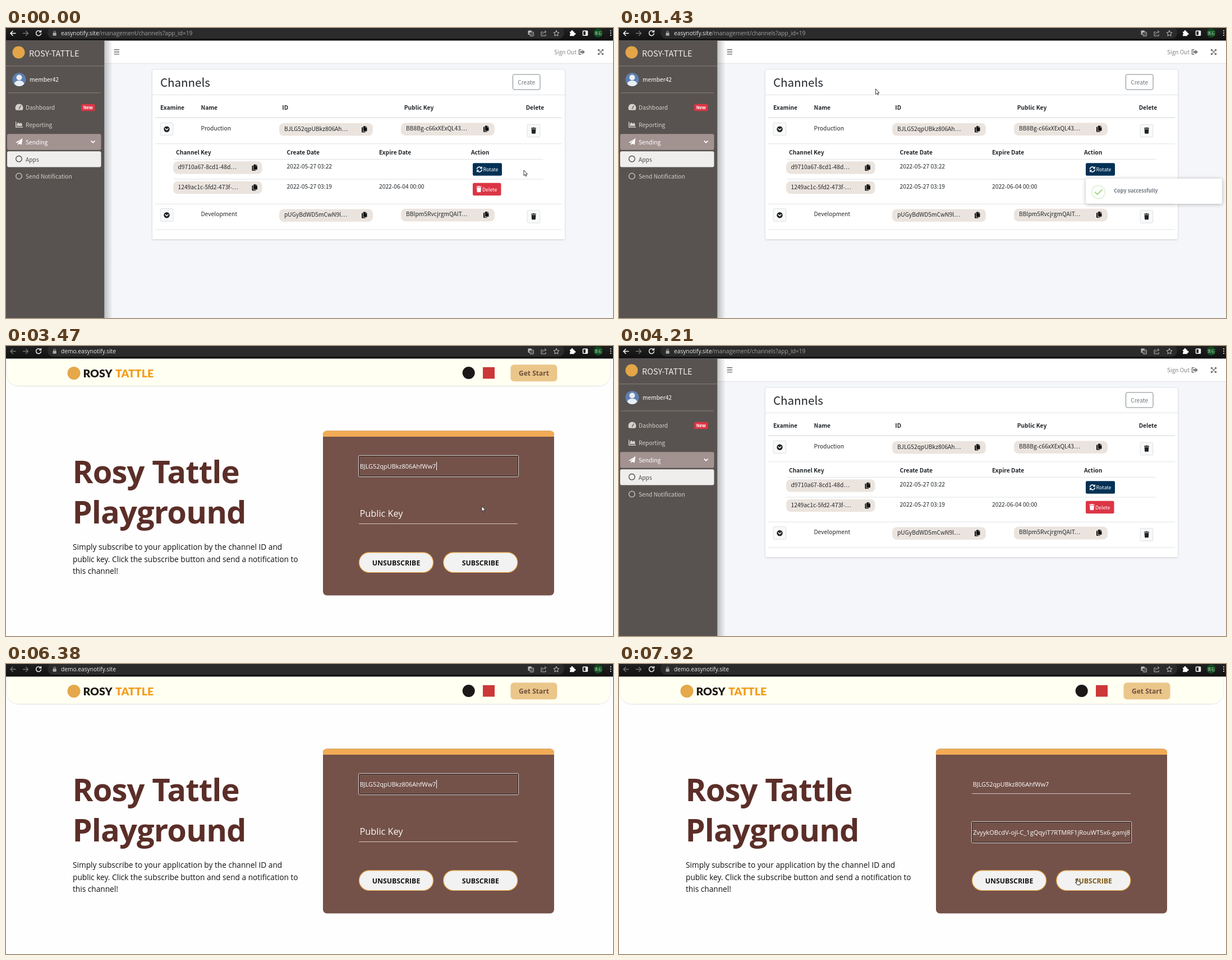
Recreate the animation shown at these times as an HTML page. Size 1082 by 518 pixels, loop 7990 ms.

```html
<!DOCTYPE html>
<html lang="en">
<head>
<meta charset="utf-8">
<title>Channel setup walkthrough</title>
<style>
  html, body { margin: 0; width: 100%; height: 100%; overflow: hidden; background: #fff; }
  svg { display: block; width: 100vw; height: 100vh; }
  text { white-space: pre; }
  .ui { font: 10.25px "Noto Sans CJK SC", "Noto Sans CJK JP", "Noto Sans", sans-serif; fill: #212529; }
  .seg { font: 10.2px "Open Sans", "Noto Sans", sans-serif; fill: #111; }
  .b { font-weight: 700; }
  .mid { text-anchor: middle; }
  .end { text-anchor: end; }
  .line { stroke: #dee2e6; fill: none; }
  .stroke { fill: none; stroke-linecap: round; stroke-linejoin: round; }
  #toast { transform-origin: 953.5px 291.5px; }
  #arc { transform-origin: 854.5px 293px; }
</style>
</head>
<body>
<svg id="stage" viewBox="0 0 1082 518" preserveAspectRatio="none" xmlns="http://www.w3.org/2000/svg"></svg>
<script>
const LOOP = 7990;

// Drawing helpers
const text = (x, y, s, cls = '', style = '', id = '') =>
  `<text x="${x}" y="${y}" class="${cls}" style="${style}" ${id && `id="${id}"`}>${s}</text>`;
const rect = (x, y, w, h, fill, r = 0, more = '') =>
  `<rect x="${x}" y="${y}" width="${w}" height="${h}" rx="${r}" fill="${fill}" ${more}/>`;
const circle = (x, y, r, fill, more = '') =>
  `<circle cx="${x}" cy="${y}" r="${r}" fill="${fill}" ${more}/>`;
const path = (d, fill, more = '') => `<path d="${d}" fill="${fill}" ${more}/>`;
const stroke = (d, color, w = 1) =>
  `<path class="stroke" d="${d}" stroke="${color}" stroke-width="${w}"/>`;
const hline = (x1, x2, y, w = 1) => `<path class="line" d="M${x1} ${y}H${x2}" stroke-width="${w}"/>`;
const at = (x, y, s) => `<g transform="translate(${x} ${y})">${s}</g>`;

// Icons
const copyIcon = (x, y) => at(x, y,
  path('M3.6 0H6.8V2.8H9.5V8.4Q9.5 9.2 8.7 9.2H3.6Q2.8 9.2 2.8 8.4V.8Q2.8 0 3.6 0ZM7.4 0 9.5 2.2H7.4Z', '#111') +
  path('M2 2H.8Q0 2 0 2.8V10.4Q0 11.2.8 11.2H5.9Q6.7 11.2 6.7 10.4V10H3.2Q2 10 2 8.8Z', '#111'));
const trash = (x, y, c) => at(x, y,
  path('M-4.5-5H-1.6L-1-5.7H1L1.6-5H4.5V-3.6H-4.5ZM-3.9-2.9H3.9L3.4 4.8Q3.3 5.5 2.6 5.5H-2.6Q-3.3 5.5-3.4 4.8Z', c));
const pill = (x, y, w = 167) => rect(x, y, w, 22.6, '#ebe4de', 8);
const lightButton = (x, y) => rect(x, y, 22.5, 22.5, '#f8f9fa', 2, 'stroke="#dcdfe2"');
const expandButton = y => lightButton(275.2, y - 11.5) + circle(286.5, y, 5.2, '#222') +
  stroke(`M284 ${y - 1}l2.5 2.5 2.5-2.5`, '#fff', 1.5);
const trashButton = y => lightButton(929.2, y - 11) + trash(940.5, y, '#222');

const browserBar = (url, rest, backColor) =>
  rect(0, 0, 1082, 22.5, 'url(#bar)') + rect(74, -2, 921, 21, '#2b2b2b', 10) +
  stroke('M17 9.5H8.5M12 5.5 8 9.5l4 4', backColor, 1.5) +
  stroke('M30.5 9.5H39M35.5 5.5l4 4-4 4', '#777', 1.4) +
  stroke('M61.6 6.4A4.5 4.5 0 1 0 62.5 10M62.5 4.5V7.3H59.5', '#eee', 1.5) +
  rect(83.5, 8.6, 6.2, 5.2, '#aaa', 1) + stroke('M85 8.5V7a1.6 1.6 0 0 1 3.2 0V8.5', '#aaa', 1) +
  text(98, 13.2, `<tspan fill="#eee">${url}</tspan><tspan fill="#a2a2a2">${rest}</tspan>`, 'seg') +
  rect(930.5, 4.5, 6.5, 7.5, '#bbb', 1) + rect(934, 7, 6.5, 7.5, '#555', 1, 'stroke="#bbb" stroke-width=".8"') +
  text(932, 11, 'a', 'seg b', 'font-size:6px;fill:#333') +
  stroke('M956.5 7H954V14H962V11.5M956.5 11Q957 7 962.5 6.8M960.5 4.6 962.8 6.8 960.5 9', '#bbb') +
  stroke('M981 4.6l1.5 3.2 3.5.4-2.6 2.4.7 3.5L981 12.4l-3.1 1.7.7-3.5L976 8.2l3.5-.4Z', '#ccc') +
  path('M1005 6.5H1007.5A1.7 1.7 0 1 1 1010.5 6.5H1013V9A1.7 1.7 0 1 1 1013 12V14.3H1005V11.8A1.6 1.6 0 0 0 1005 8.8Z', '#fff') +
  rect(1028.5, 5.2, 8, 8, 'none', 1, 'stroke="#fff" stroke-width="1.5"') + rect(1033, 5, 4, 8.5, '#fff') +
  circle(1055.5, 9, 8, '#0f4b1d') + text(1055.5, 11.6, '青石', 'ui mid', 'font-size:6.5px;fill:#cfe3d1') +
  [5, 9, 13].map(y => circle(1078, y, 1.1, '#eee')).join('');

const sidebar =
  rect(176, 23, 14, 495, 'url(#shade)') + rect(0, 22.5, 175.5, 495.5, '#585350') +
  circle(22.5, 43.5, 11, '#e3a548') +
  text(41, 50.8, 'ROSY-TATTLE', 'ui', 'font-size:14.6px;fill:#f2efec') +
  rect(0, 67.3, 175.5, 1, '#86817d') + rect(3, 115.3, 166, 1, '#86817d') +
  circle(23.5, 92, 12, '#5f7fae') + circle(23.5, 88.5, 5, '#e9eef5') +
  path('M14.5 99.8Q16 94 23.5 94T32.5 99.8Q29 104 23.5 104T14.5 99.8Z', '#e9eef5') +
  text(42, 95.5, 'member42', 'ui', 'fill:#fff') +
  path('M18 146.8A7 7 0 1 1 29 146.8Z', '#d3cfcb') + stroke('M23.5 144 26 139.2', '#585350', 1.3) +
  text(35, 146, 'Dashboard', 'ui', 'fill:#d3cfcb') +
  rect(134, 135.8, 24.5, 12.4, '#dc3545', 2.5) +
  text(146.3, 145, 'New', 'ui b mid', 'font-size:7.9px;fill:#fff') +
  stroke('M17.7 168V177H29.5', '#d3cfcb', 1.5) + path('M19.5 175V171.5L22 168.5 24.5 171 27 169 28.8 172.5V175Z', '#d3cfcb') +
  text(35, 177, 'Reporting', 'ui', 'fill:#d3cfcb') +
  rect(2, 189.3, 167.5, 28.4, '#a29290', 3) +
  path('M17 204.5 29.5 197 27.8 208.6 23.3 206.8 21.2 209.3V205.8L27 199.5 20 205.2Z', '#fff') +
  text(35, 207.6, 'Sending', 'ui', 'fill:#fff') + stroke('M152 201.8 155 204.8 158 201.8', '#fff', 1.7) +
  rect(2, 220.2, 167.5, 28.4, '#efeeec', 3) +
  circle(23, 233.8, 5.3, 'none', 'stroke="#444" stroke-width="1.3"') +
  text(35, 238.6, 'Apps', 'ui', 'fill:#4c4844') +
  circle(23, 264.6, 5.3, 'none', 'stroke="#d3cfcb" stroke-width="1.3"') +
  text(35, 269.4, 'Send Notification', 'ui', 'fill:#d3cfcb');

const topBar =
  rect(176, 22.5, 906, 40.7, '#fff') + hline(176, 1082, 63.3) +
  [38.8, 42.7, 46.6].map(y => stroke(`M193 ${y}h8.5`, '#666', 1.4)).join('') +
  text(977, 46.7, 'Sign Out', 'ui', 'font-size:10px;fill:#858585') +
  stroke('M1025 38.8H1021.5V47H1025', '#777', 1.5) + path('M1023.5 41.3H1027.3V38.8L1032 42.9 1027.3 47V44.5H1023.5Z', '#777') +
  stroke('M1056 39 1064 47M1064 39 1056 47', '#666', 1.2) +
  path('M1055 38H1058.8L1055 41.8ZM1065 38V41.8L1061.2 38ZM1055 48V44.2L1058.8 48ZM1065 48H1061.2L1065 44.2Z', '#666');

const dataRow = (dy, name, id, key) =>
  text(347.5, 182.7 + dy, name, 'ui') +
  text(496, 183.6 + dy, id, 'ui') + copyIcon(634, 175.2 + dy) +
  text(713, 183 + dy, key, 'ui') + copyIcon(851, 174.6 + dy);

const keyRow = (dy, key, made, expires = '') =>
  pill(298, 238.2 + dy, 158.5) + text(306.5, 252 + dy, key, 'ui') + copyIcon(438.5, 243.8 + dy) +
  text(500.5, 251.3 + dy, made, 'ui') + text(665, 251.3 + dy, expires, 'ui');

const heads = (y, list) => list.map(([x, s]) => text(x, y, s, 'ui b')).join('');

const card =
  rect(260.5, 74.5, 736, 303.5, '#fff', 3, 'filter="url(#soft)"') +
  rect(260.5, 74, 736, 303.5, '#fff', 3, 'stroke="#dcdfe3" stroke-width=".8"') +
  text(275, 105, 'Channels', 'ui', 'font-size:20.5px') + hline(260.5, 996.5, 119.4) +
  rect(903.5, 83, 48.5, 27, '#fff', 2.5, 'stroke="#7b838a"') +
  text(927.7, 100.6, 'Create', 'ui mid', 'fill:#6c757d') +
  heads(146.4, [[275, 'Examine'], [347.5, 'Name'], [492.3, 'ID'], [709.7, 'Public Key'], [926.7, 'Delete']]) +
  hline(266, 991, 160.2, 1.6) + pill(487, 170) + pill(704, 169.4) +
  rect(266, 160, 725, 47, '#000', 0, 'id="hover" opacity=".075"') +
  expandButton(180.8) + trashButton(183.3) +
  dataRow(0, 'Production', 'BJLG52qpUBkz806Ah…', 'BB8Bg-c66xXExQL43…') +
  hline(266, 991, 206.8) +
  heads(226, [[303, 'Channel Key'], [500.5, 'Create Date'], [665, 'Expire Date'], [829, 'Action']]) +
  hline(299, 957.5, 234.5) + keyRow(0, 'd9710a67-8cd1-48d…', '2022-05-27 03:22') +
  hline(299, 957.5, 270) + keyRow(35.5, '1249ac1c-5fd2-473f-…', '2022-05-27 03:19', '2022-06-04 00:00') +
  rect(832, 241.2, 52, 22.6, '#003155', 2.5) +
  stroke('M839.5 251.5A4.3 4.3 0 0 1 847 249.7M848.2 253.5A4.3 4.3 0 0 1 840.7 255.3', '#fff', 1.6) +
  path('M848.8 247V251.4H844.4ZM839 258V253.6H843.4Z', '#fff') +
  text(850.5, 256, 'Rotate', 'ui', 'font-size:8.9px;fill:#fff') +
  rect(832, 276.8, 50.5, 22.4, '#dc3545', 2.5) + trash(843, 287.7, '#fff') +
  text(849, 291.6, 'Delete', 'ui', 'font-size:8.9px;fill:#fff') +
  hline(266, 991, 314.3) + pill(487, 323.4) + pill(704, 322.8) +
  expandButton(334.2) + trashButton(336.7) +
  dataRow(153.3, 'Development', 'pUGyBdWD5mCwN9l…', 'BBlpm5RvcjrgmQAIT…') +
  hline(266, 991, 360);

const toastBox = `<g id="toast">` +
  rect(832, 269, 243, 45, '#fff', 4, 'filter="url(#drop)"') +
  circle(854.5, 293, 11.7, 'none', 'stroke="#a5dc86" stroke-opacity=".32" stroke-width="2"') +
  circle(854.5, 293, 11.7, 'none', 'id="arc" stroke="#a5dc86" stroke-width="2" stroke-dasharray="15.3 3 21.4 33.8"') +
  `<path id="tick" class="stroke" d="M848.7 293.3 852.7 297.2 860.8 289" stroke="#a5dc86" stroke-width="2.2" pathLength="1" stroke-dasharray="1 2"/>` +
  text(882, 293.6, 'Copy successfully', 'ui b', 'font-size:9.1px;fill:#6c757d') + `</g>`;

const field = (id, y, label, value) =>
  stroke(`M629.5 ${y + 36}H911.5`, '#d5c6c0') +
  `<g id="focus${id}">` + rect(628.5, y, 285, 38, '#74524a', 2, 'stroke="#e6dfdc"') +
  rect(629.5, y + 1, 283, 36, 'none', 1, 'stroke="#1b1412"') + `</g>` +
  text(630.5, y + 23.3, label, 'seg', 'font-size:16.3px;fill:#fdf9f2', 'label' + id) +
  `<g id="value${id}">${value}</g>`;

const button = (x, s, id) =>
  rect(x, 368.8, 132, 35.7, '#f2f2f2', 17.8, 'stroke="#eba745" stroke-width="1.2"') +
  text(x + 66, 391.7, s, 'seg b mid', 'font-size:12.3px', id);

const demo =
  rect(0, 0, 1082, 518, '#fefefe') +
  path('M2 22H1077V47Q1077 71 1053 71H26Q2 71 2 47Z', '#fffff2', 'filter="url(#soft)"') +
  circle(121, 48.5, 11.5, '#e5a84a') +
  text(137.5, 55.7, 'ROSY', 'b', 'font:900 19.5px Lato,sans-serif;fill:#1c1712') +
  text(195, 55.7, 'TATTLE', 'b', 'font:900 19.5px Lato,sans-serif;fill:#f39c1a') +
  circle(824.7, 48, 11, '#1b1817') + rect(850, 37.8, 21, 20.6, '#cb3837') +
  rect(899.5, 33.2, 83, 30, '#ebc68a', 6) + text(941, 52.7, 'Get Start', 'seg b mid', 'font-size:12px;fill:#70503f') +
  ['Rosy Tattle', 'Playground'].map((s, i) =>
    text(118.5, 245 + i * 71.5, s, 'seg b', 'font-size:56px;letter-spacing:-.015em;fill:#5b2e28')).join('') +
  ['Simply subscribe to your application by the channel ID and',
   'public key. Click the subscribe button and send a notification to',
   'this channel!'].map((s, i) => text(119, 364 + i * 21.5, s, 'seg', 'font-size:13.7px')).join('') +
  rect(565, 151.5, 412, 294, '#74524a', 7) +
  path('M565 162V158.5Q565 151.5 572 151.5H970Q977 151.5 977 158.5V162Z', '#f2ab55') +
  field(1, 195.5, 'Channel ID',
    text(630.7, 219, 'BJLG52qpUBkz806AhfWw7', 'seg', 'font-size:10.9px;fill:#fff') +
    '<path id="caret" d="M767.5 207V222" stroke="#fff"/>') +
  field(2, 281.5, 'Public Key', '<g clip-path="url(#inner)">' +
    text(911.2, 304.8, 'TZvyykOBcdV-ojl-C_1gQqyiT7RTMRF1jRouWT5x6-gamj8', 'seg end', 'font-size:11.15px;fill:#fff') + '</g>') +
  button(629.5, 'UNSUBSCRIBE', 'unsub') + button(779.8, 'SUBSCRIBE', 'sub');

const pointers = {
  a: path('M0 0V9.6L2.2 7.6 3.6 10.8 5 10.2 3.6 7.1H6.6Z', '#fff', 'stroke="#222" stroke-width=".9"'),
  h: path('M-1 1V6L-2.1 4.9Q-3.3 5.2-2.8 6.2L0 10.6H4.8L5.2 8V5Q4.8 3.9 3.7 4.5 3 3.5 2.2 4.2 1.6 3.4 1 3.8V1Q0-.8-1 1Z', '#fff', 'stroke="#111" stroke-width=".9"'),
  i: stroke('M-2-5H2M0-5V5M-2 5H2', '#e8e0dc', 1)
};

const $ = id => document.getElementById(id);
$('stage').innerHTML = `<defs>
  <linearGradient id="bar" x2="0" y2="1"><stop stop-color="#202020"/><stop offset="1" stop-color="#111"/></linearGradient>
  <linearGradient id="shade"><stop stop-color="#000" stop-opacity=".22"/><stop offset="1" stop-color="#000" stop-opacity="0"/></linearGradient>
  <filter id="soft"><feDropShadow dx="0" dy=".7" stdDeviation="1" flood-opacity=".15"/></filter>
  <filter id="drop" y="-50%" height="200%"><feDropShadow dx="0" dy="1" stdDeviation="3.5" flood-opacity=".28"/></filter>
  <clipPath id="inner">${rect(630.5, 283, 281, 35, '#000')}</clipPath></defs>
  <g id="admin">${rect(0, 0, 1082, 518, '#f4f6f9') + topBar + sidebar + card + toastBox +
    browserBar('easynotify.site', '/management/channels?app_id=19', '#fff')}</g>
  <g id="demo">${demo + browserBar('demo.easynotify.site', '', '#777')}</g>
  <g id="pointer">${Object.entries(pointers).map(([k, s]) => `<g id="p-${k}">${s}</g>`).join('')}</g>`;

// Pointer path: time, x, y, shape (empty = outside the page)
const track = [
  [0, 923, 254, 'a'], [70, 920, 252, 'a'], [250, 815, 222, 'a'], [420, 690, 194, 'a'], [560, 637, 183, 'h'],
  [950, 637, 183, 'h'], [1010, 630, 177, 'a'], [1250, 540, 135, 'a'], [1490, 430, 100, ''],
  [2250, 296, 75, 'a'], [2420, 520, 155, 'a'], [2640, 724, 218, 'i'], [3050, 724, 218, 'a'],
  [3120, 848, 286, 'a'], [3470, 848, 286, 'a'], [3610, 757, 209, 'i'], [3810, 750, 205, 'a'], [4000, 675, 157, ''],
  [4410, 246, 52, 'a'], [4620, 480, 130, 'a'], [4900, 740, 176, 'a'], [5120, 848, 183, 'h'],
  [5760, 848, 183, 'h'], [5800, 838, 168, 'a'], [6030, 740, 80, ''],
  [6640, 442, 88, 'a'], [6850, 740, 290, 'i'], [6990, 770, 300, 'a'], [7110, 1019, 396, 'a'],
  [7380, 1019, 396, 'a'], [7600, 900, 392, 'h'], [7850, 817, 384, 'h'], [LOOP, 817, 384, 'h']
];

function pointerAt(t) {
  const i = track.findLastIndex(k => k[0] <= t);
  const [t0, x0, y0, kind] = track[i], [t1, x1, y1] = track[i + 1] || track[i];
  const p = t1 > t0 ? (t - t0) / (t1 - t0) : 0;
  return { x: x0 + (x1 - x0) * p, y: y0 + (y1 - y0) * p, kind };
}

// Paused animations, driven by the time since the toast opened
const pose = (y, deg) => `translateY(${y}px) rotate(${deg}deg)`;
const paused = (id, frames, delay, duration) => {
  const a = $(id).animate(frames, { delay, duration, fill: 'both' });
  a.pause();
  return a;
};
const toastAnims = [
  paused('toast', [pose(-7, 2), pose(0, -2), pose(3.6, 2), pose(0, 0)].map((transform, i) =>
    ({ transform, offset: [0, .33, .66, 1][i], easing: 'ease' })), 0, 500),
  paused('arc', [{ transform: 'rotate(-119deg)' }, { transform: 'rotate(-479deg)' }], 212, 298),
  paused('tick', [{ strokeDashoffset: 1.2 }, { strokeDashoffset: 0 }], 405, 280)
];

const show = (id, on) => { $(id).style.display = on ? '' : 'none'; };
const within = (t, a, b) => t >= a && t < b;

function draw(t) {
  const onDemo = within(t, 1900, 4210) || t >= 6380;
  show('admin', !onDemo);
  show('demo', onDemo);

  const { x, y, kind } = pointerAt(t);
  for (const k in pointers) show('p-' + k, k === kind);
  $('pointer').setAttribute('transform', `translate(${x.toFixed(2)} ${y.toFixed(2)})`);
  show('hover', kind && x > 266 && x < 991 && y > 160 && y < 207);

  const age = t < 4210 ? t - 716 : t - 5452;
  show('toast', age >= 0);
  show('arc', within(age, 212, 510));
  toastAnims.forEach(a => { a.currentTime = Math.max(0, age); });

  const pasted1 = t >= 3470, pasted2 = t >= 7310;
  show('focus1', within(t, 2990, 6970));
  show('focus2', t >= 6970);
  show('label1', !pasted1);
  show('value1', pasted1);
  show('caret', t < 6970);
  show('label2', !pasted2);
  show('value2', pasted2);
  const overSubscribe = kind === 'h' && x > 780 && x < 912 && y > 368 && y < 405;
  $('sub').style.fill = overSubscribe ? '#7d5a12' : '#111';
}

let start;
function tick(now) {
  start ??= now;
  draw((now - start) % LOOP);
  requestAnimationFrame(tick);
}
draw(0);
requestAnimationFrame(tick);
</script>
</body>
</html>
```
